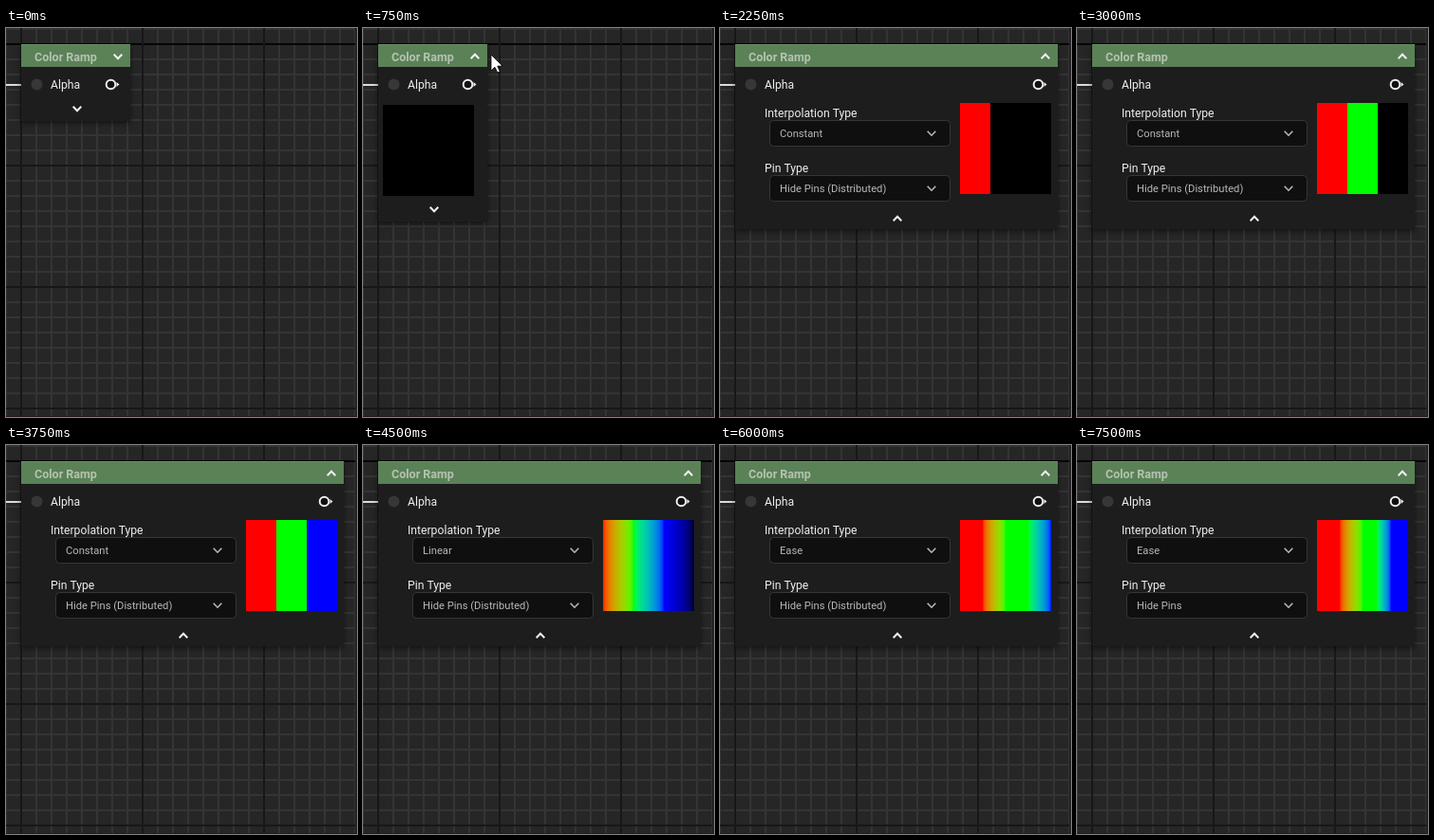
These frames come from a looping animation (370x410 px, 8000 ms). An HTML page with a canvas:

```html
<!DOCTYPE html>
<html lang="en">
<head>
<meta charset="utf-8">
<title>Color Ramp node</title>
<style>
  html, body { margin: 0; width: 100%; height: 100%; overflow: hidden; background: #262626; }
  canvas { display: block; }
</style>
</head>
<body>
<canvas id="stage" width="370" height="410"></canvas>
<script>
const ctx = document.getElementById('stage').getContext('2d');
const STEP = 750, LOOP = 8000;

const RED = [1, 0, 0], GREEN = [0, 1, 0], BLUE = [0, 0, 1], BLACK = [0, 0, 0];
const thirds = (...colors) => colors.map((color, i) => ({ at: i / 3, color }));
const three = (last = 1) => [{ at: 0, color: RED }, { at: .5, color: GREEN }, { at: last, color: BLUE }];

const SMALL = { right: 131, bottom: 98, arrowY: 85 };
const MEDIUM = { right: 131, bottom: 204, arrowY: 191, preview: [21, 81] };
const WIDE = { right: 356, bottom: 212, arrowY: 201, preview: [253, 79], options: true };
const ramp = (type, stops, pins = 'Hide Pins (Distributed)') => ({ ...WIDE, type, stops, pins });

const states = [
  SMALL,
  { ...MEDIUM, stops: thirds(BLACK), cursor: [135, 28] },
  { ...ramp('Constant', thirds(BLACK)), cursor: [359, 209] },
  ramp('Constant', thirds(RED, BLACK, BLACK)),
  ramp('Constant', thirds(RED, GREEN, BLACK)),
  ramp('Constant', thirds(RED, GREEN, BLUE)),
  ramp('Linear', thirds(RED, GREEN, BLUE, BLACK)),
  ramp('Linear', three()),
  ramp('Ease', three()),
  ramp('Ease', three(), 'Hide Pins'),
  ramp('Ease', three(.81), 'Hide Pins')
];

function rect(x, y, w, h, color) {
  ctx.fillStyle = color;
  ctx.fillRect(x, y, w, h);
}

function text(label, x, y, size, color, weight = 400) {
  ctx.font = `${weight} ${size}px Roboto, sans-serif`;
  ctx.fillStyle = color;
  ctx.fillText(label, x, y);
}

function chevron(x, y, up, color = '#f0f0f0', width = 2) {
  const d = up ? -2.2 : 2.2;
  ctx.beginPath();
  ctx.moveTo(x - 4.3, y - d);
  ctx.lineTo(x, y + d);
  ctx.lineTo(x + 4.3, y - d);
  ctx.strokeStyle = color;
  ctx.lineWidth = width;
  ctx.stroke();
}

function polygon(points, color) {
  ctx.beginPath();
  points.forEach(([x, y]) => ctx.lineTo(x, y));
  ctx.closePath();
  ctx.fillStyle = color;
  ctx.fill();
}

function grid() {
  rect(0, 0, 370, 410, '#262626');
  for (let p = 0; p < 410; p += 16) {
    rect(p - 1, 0, 2, 410, '#343434');
    rect(0, p, 370, 2, '#343434');
  }
  for (let p = 16; p < 410; p += 128) {
    rect(p - 1, 0, 2, 410, '#171717');
    rect(0, p, 370, 2, p === 16 ? '#060606' : '#171717');
  }
  rect(368, 0, 2, 410, '#222222');
  rect(0, 409, 370, 1, '#2a1a1d');
}

// Colours blend in linear light and are encoded for display.
const encode = v => 255 * (v <= .0031308 ? 12.92 * v : 1.055 * v ** (1 / 2.4) - .055);

function sample(stops, type, t) {
  const i = stops.findLastIndex(stop => stop.at <= t);
  const a = stops[i], b = stops[i + 1];
  let mix = 0;
  if (b && type !== 'Constant') {
    mix = (t - a.at) / (b.at - a.at);
    if (type === 'Ease') mix = Math.max(0, 2 * mix - 1);
  }
  return a.color.map((v, k) => encode(v + (b ? (b.color[k] - v) * mix : 0)));
}

function preview([x, y], stops, type = 'Constant') {
  for (let i = 0; i < 96; i++) {
    rect(x + i, y, 1, 96, `rgb(${sample(stops, type, (i + .5) / 96).map(Math.round)})`);
  }
}

function dropdown(label, value, y) {
  text(label, 47, y - 3, 12.2, '#eeeeee');
  ctx.beginPath();
  ctx.roundRect(52.5, y + .5, 190, 27, 4);
  ctx.fillStyle = '#0f0f0f';
  ctx.fill();
  ctx.strokeStyle = '#363636';
  ctx.lineWidth = 1;
  ctx.stroke();
  text(value, 63, y + 18, 11.2, '#b8b8b8');
  chevron(223, y + 14, false, '#b8b8b8', 1.6);
}

function node({ right, bottom, arrowY, options }) {
  const width = right - 16;
  rect(0, 59, 17, 2, '#dcdcdc');

  ctx.save();
  ctx.shadowColor = 'rgba(0,0,0,.55)';
  ctx.shadowBlur = 6;
  ctx.shadowOffsetY = 2;
  rect(16, 18, width, bottom - 18, '#1d1d1d');
  ctx.restore();
  rect(16, 17, width, 24, '#5a8256');
  rect(16, 17, width, 1, '#668d61');

  text('Color Ramp', 30, 35, 12.5, '#b5c2b2', 700);
  chevron(right - 13, 30, bottom > 98);

  ctx.beginPath();
  ctx.arc(32.5, 59.5, 6, 0, 7);
  ctx.fillStyle = '#373737';
  ctx.fill();
  text('Alpha', 47, 64, 12.2, '#eeeeee');

  const pin = right - 20.5;
  ctx.beginPath();
  ctx.arc(pin, 59.5, 4.8, 0, 7);
  ctx.fillStyle = '#101010';
  ctx.fill();
  ctx.strokeStyle = '#eeeeee';
  ctx.lineWidth = 2;
  ctx.stroke();
  polygon([[pin + 6, 57], [pin + 9, 59.5], [pin + 6, 62]], '#eeeeee');

  chevron(options ? 187 : 75, arrowY, options);
}

function cursor([x, y]) {
  const outline = [[0, 0], [0, 17], [4, 13.3], [6.7, 19], [9.3, 17.8], [6.8, 12.2], [12, 12]];
  polygon(outline.map(([dx, dy]) => [x + dx, y + dy]), '#ffffff');
  ctx.strokeStyle = '#000000';
  ctx.lineWidth = .8;
  ctx.stroke();
}

function draw(now) {
  const state = states[Math.floor(now % LOOP / STEP)];
  grid();
  node(state);
  if (state.preview) preview(state.preview, state.stops, state.type);
  if (state.options) {
    dropdown('Interpolation Type', state.type, 97);
    dropdown('Pin Type', state.pins, 155);
  }
  if (state.cursor) cursor(state.cursor);
  requestAnimationFrame(() => draw(performance.now()));
}

draw(performance.now());
</script>
</body>
</html>
```
